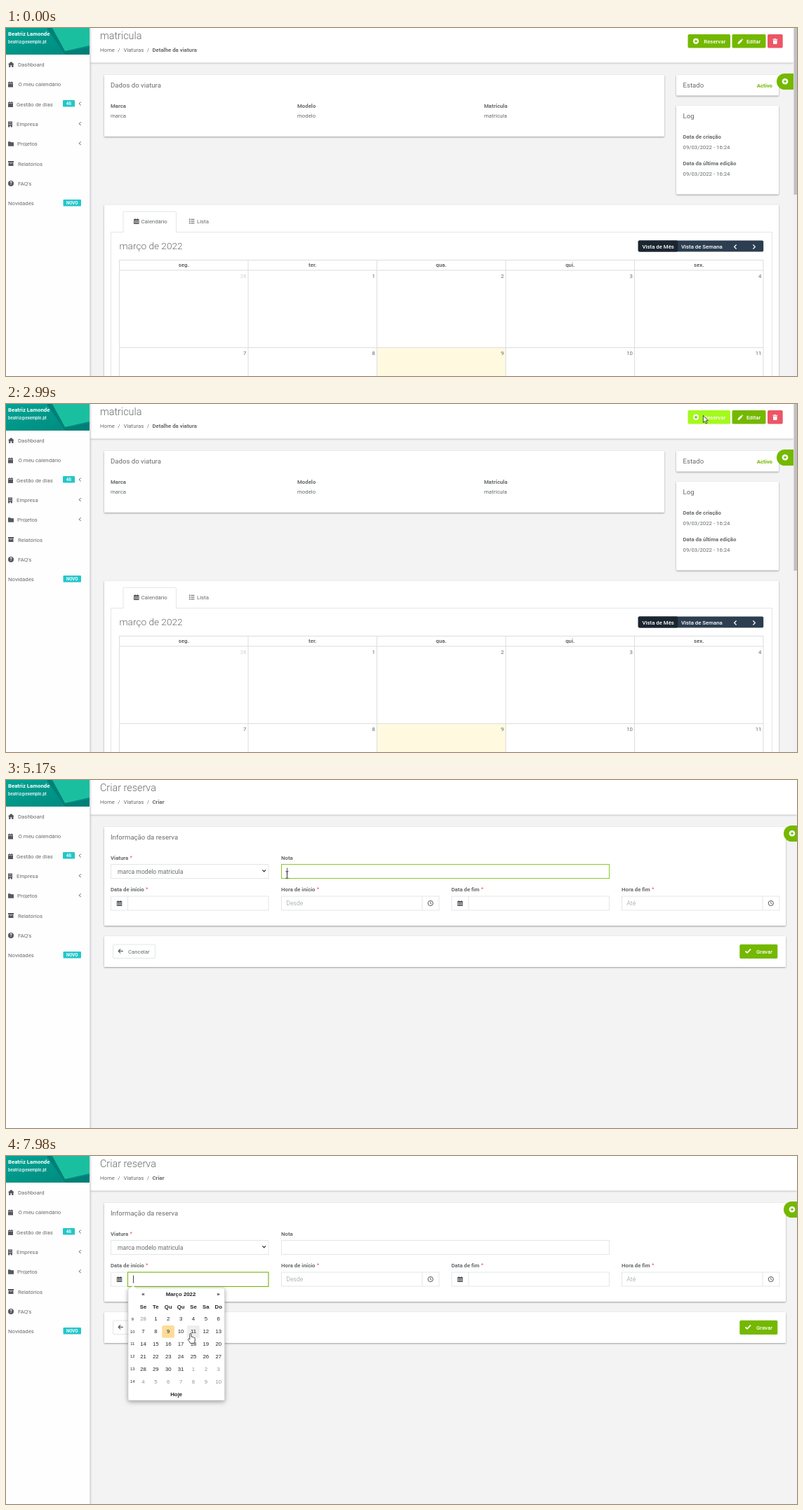
These frames come from a looping animation (1127 px wide and 497 px high, 8000 ms). An HTML page:

```html
<!DOCTYPE html>
<html lang="pt">
<head>
<meta charset="utf-8">
<title>Criar reserva</title>
<style>
  html, body { margin: 0; width: 100%; height: 100%; overflow: hidden; background: #f3f3f4; }
  svg { display: block; width: 100%; height: 100%; }
  text { font-family: Roboto, sans-serif; white-space: pre; }
  .picker text { font-family: "Liberation Sans", Arial, sans-serif; }
  .card { fill: #fff; filter: drop-shadow(0 1px 1px rgba(0, 0, 0, .36)); }
  .pop { fill: #fff; filter: drop-shadow(0 2px 3px rgba(0, 0, 0, .35)); }
</style>
</head>
<body>
<svg id="stage" viewBox="0 0 1127 497" xmlns="http://www.w3.org/2000/svg"></svg>
<script>
const LOOP = 8000;
const GREEN = '#74b800', GREY = '#676a6c', DARK = '#54575a', LINE = '#e3e5e7';

// Text placed by the middle of its capitals.
function text(x, y, str, o = {}) {
  const { size = 7.8, weight = 400, fill = GREY, anchor = 'start', font = '' } = o;
  const family = font ? ` style="font-family:${font},sans-serif"` : '';
  return `<text x="${x}" y="${y + size * .355}" font-size="${size}" font-weight="${weight}" fill="${fill}" text-anchor="${anchor}"${family}>${str}</text>`;
}
const bold = (x, y, str, o = {}) => text(x, y, str, { weight: 700, ...o });
const heading = (x, y, str) => text(x, y, str, { size: 9.6 });
const rect = (x, y, w, h, attrs) => `<rect x="${x}" y="${y}" width="${w}" height="${h}" ${attrs}/>`;
const box = (x, y, w, h, attrs = '') => rect(x + .5, y + .5, w - 1, h - 1, `fill="#fff" stroke="${LINE}" ${attrs}`);
const card = (x, y, w, h) => rect(x, y, w, h, 'class="card" rx="1"');
const button = (x, y, w, h, fill, id = '') => rect(x, y, w, h, `rx="1.8" fill="${fill}" ${id && `id="${id}"`}`);
const shape = (x, y, d, fill = DARK) => `<path transform="translate(${x} ${y})" d="${d}" fill="${fill}" fill-rule="evenodd"/>`;
const stroke = (x, y, d, color = DARK, w = 1.2) => `<path transform="translate(${x} ${y})" d="${d}" fill="none" stroke="${color}" stroke-width="${w}"/>`;
const group = (id, body, attrs = '') => `<g id="${id}" ${attrs}>${body}</g>`;
const range = n => [...Array(n).keys()];

const ICON = {
  house: 'M4.3 0 8.8 4H7.5V8H5.2V5.2H3.4V8H1.1V4H-.2Z',
  calendar: 'M0 1H1.3V0H2.5V1H4.5V0H5.7V1H7V8H0ZM.4 2.4V3H6.6V2.4Z',
  building: 'M0 0H6V8H3.7V6.3H2.3V8H0ZM1.3 1.2V2.3H2.4V1.2ZM3.6 1.2V2.3H4.7V1.2ZM1.3 3.6V4.7H2.4V3.6ZM3.6 3.6V4.7H4.7V3.6Z',
  folder: 'M0 .5H3L4 1.5H8V7H0Z',
  archive: 'M0 0H8V2H0ZM.5 2.6H7.5V7H.5ZM3 3.4V4.1H5V3.4Z',
  grid: 'M0 1H1.5V0H2.5V1H5V0H6V1H7.5V8H0ZM.9 3V4.2H2.2V3ZM3.1 3V4.2H4.4V3ZM5.3 3V4.2H6.6V3ZM.9 5.3V6.6H2.2V5.3ZM3.1 5.3V6.6H4.4V5.3ZM5.3 5.3V6.6H6.6V5.3Z',
  pencil: 'M0 8 .5 5.6 4.8 1.3 6.7 3.2 2.4 7.5ZM5.4.7 6.1 0 8 1.9 7.3 2.6Z',
  trash: 'M0 .8H2.2L2.7 0H4.3L4.8.8H7V1.8H0ZM.5 2.4H6.5L6.1 8H.9Z',
  list: 'M0 0H1.4V1.4H0ZM2.4.2H7.5V1.2H2.4ZM0 2.8H1.4V4.2H0ZM2.4 3H7.5V4H2.4ZM0 5.6H1.4V7H0ZM2.4 5.8H7.5V6.8H2.4Z'
};
const plusDisc = (x, y, r, ink) =>
  `<circle cx="${x}" cy="${y}" r="${r}" fill="#fff"/>` + stroke(x, y, 'M-2.2 0H2.2M0 -2.2V2.2', ink, 1.2);
const clock = (x, y) =>
  `<circle cx="${x}" cy="${y}" r="3.6" fill="none" stroke="${DARK}"/>` + stroke(x, y, 'M0 -2.2V.2L1.5 1', DARK, .9);
const fab = (x, right) =>
  shape(x, 65, `M${right - x} 0H11.5A11.5 11.5 0 0 0 11.5 23H${right - x}Z`, GREEN) + plusDisc(x + 12, 76.3, 4.3, GREEN);

function sidebar() {
  const items = [
    [17, 52, 'Dashboard', 'house'], [17.5, 80.5, 'O meu calendário', 'calendar'],
    [15, 109, 'Gestão de dias', 'calendar'], [15, 137.5, 'Empresa', 'building'],
    [16, 165.7, 'Projetos', 'folder'], [17, 194, 'Relatórios', 'archive'],
    [17, 222.3, "FAQ's"], [3, 250.7, 'Novidades']
  ];
  const badge = (x, y, w, str) => rect(x, y, w, 9.4, 'rx="1" fill="#23c6c8"') +
    bold(x + w / 2, y + 4.7, str, { size: 5.5, fill: '#fff', anchor: 'middle', font: 'Inter' });
  return rect(0, 0, 119.5, 497, 'fill="#fefefe" style="filter:drop-shadow(1px 0 1px rgba(0,0,0,.22))"') +
    rect(0, 0, 119, 38, 'fill="url(#teal)"') +
    shape(0, 0, 'M58 0H70L92 33 119 27V38H84Z', '#007f78') +
    shape(0, 0, 'M66 0H119V25L84 33Z', '#1abf9f') +
    bold(3, 8, 'Beatriz Lamonde', { fill: '#fff', weight: 600 }) +
    text(3, 20.5, 'beatriz@exemplo.pt', { size: 5.6, weight: 600, fill: '#fff', font: 'Inter' }) +
    items.map(([x, y, str, icon]) => text(x, y, str) + (icon ? shape(3, y - 4, ICON[icon]) : '')).join('') +
    `<circle cx="7" cy="222" r="4" fill="${DARK}"/>` + bold(7, 222, '?', { size: 6.5, fill: '#fff', anchor: 'middle' }) +
    badge(81, 103, 17, '46') + badge(81.5, 245, 25.5, 'NOVO') +
    [108, 136.7, 164.7].map(y => stroke(104, y, 'M2.6 -2.4 .2 0 2.6 2.4', DARK, 1)).join('');
}

function header(title, leaf, right) {
  return rect(120, -5, right - 120, 54.5, 'class="card" style="filter:drop-shadow(0 1px 1px rgba(0,0,0,.2))"') +
    text(134, 11, title, { size: 14.4, weight: 300 }) +
    text(134, 31.2, 'Home') + text(159.3, 31.2, '/') + text(167.5, 31.2, 'Viaturas') +
    text(200.8, 31.2, '/') + bold(208.5, 31.2, leaf);
}

function detailPage() {
  const fields = [[149, 'Marca', 'marca'], [415, 'Modelo', 'modelo'], [681, 'Matrícula', 'matricula']];
  const dates = [['Data de criação', 155.5], ['Data da última edição', 193.5]];
  const colX = i => 161.5 + 183.5 * i;
  const days = ['seg.', 'ter.', 'qua.', 'qui.', 'sex.'];
  const white = { fill: '#fff', weight: 500 };
  return header('matricula', 'Detalhe da viatura', 1122) +
    button(971.5, 9, 60.5, 19.5, GREEN, 'reserve') + plusDisc(983, 18.8, 4, GREEN) + text(994.3, 19, 'Reservar', white) +
    button(1034.5, 9, 48, 19.5, GREEN) + shape(1042.5, 15, ICON.pencil, '#fff') + text(1055, 19, 'Editar', white) +
    button(1085, 9, 21.7, 19.5, '#ed5565') + shape(1092.3, 15, ICON.trash, '#fff') +
    card(140, 67, 798, 88) + heading(149, 82, 'Dados do viatura') +
    fields.map(([x, k, v]) => bold(x, 111, k) + text(x, 125.7, v)).join('') +
    card(955, 67, 146, 29.5) + heading(964.5, 82, 'Estado') + bold(1092, 82, 'Activo', { fill: GREEN, anchor: 'end' }) +
    card(955, 111, 146, 126.5) + heading(964.5, 126, 'Log') +
    dates.map(([str, y]) => bold(964.5, y, str) + text(964.5, y + 14.8, '09/03/2022 - 16:24')).join('') +
    card(140, 252.5, 961, 260) + box(149, 291, 943, 230) +
    `<path d="M167 292V264q0 -1.8 1.8 -1.8H240.7q1.8 0 1.8 1.8V292" fill="#fff" stroke="${LINE}"/>` +
    shape(182, 272, ICON.grid) + text(192.5, 276.2, 'Calendário') +
    shape(261, 272.5, ICON.list) + text(272, 276.2, 'Lista') +
    text(161.5, 311.5, 'março de 2022', { size: 13.65, weight: 300 }) +
    button(900.7, 303.5, 178.5, 16, '#2c3e50') + button(900.7, 303.5, 56.5, 16, '#1a252f') +
    text(906.5, 312.6, 'Vista de Mês', white) + text(962, 312.6, 'Vista de Semana', white) +
    stroke(1037, 312.5, 'M3.6 -3 .6 0 3.6 3', '#fff') + stroke(1064, 312.5, 'M.4 -3 3.4 0 .4 3', '#fff') +
    rect(colX(2), 456.5, 183.5, 41, 'fill="#fffadf"') +
    `<path d="M161.5 331.5H1079M161.5 346H1079M161.5 456.5H1079${range(6).map(i => `M${colX(i)} 331V497`).join('')}" fill="none" stroke="#ddd"/>` +
    days.map((d, i) => bold(colX(i) + 91.7, 338.5, d, { anchor: 'middle' }) +
      text(colX(i + 1) - 2.5, 354.3, i || 28, { anchor: 'end', fill: i ? GREY : '#d2d2d3' }) +
      text(colX(i + 1) - 2.5, 464.5, 7 + i, { anchor: 'end' })).join('') +
    fab(1098, 1122) + rect(1122, 0, 5, 497, 'fill="#f1f1f1"') + rect(1122.5, 0, 4.5, 238, 'fill="#c1c1c1"');
}

function formPage() {
  const label = (x, y, str, star) =>
    bold(x, y, str + (star ? '<tspan dx="2.5" dy="-.8" font-size="6.5" fill="#e0604f">*</tspan>' : ''));
  const big = { size: 8.6 }, hint = { size: 8.6, fill: '#b4b6b8' };
  const dateField = (x, str) => label(x, 156.5, str, true) + box(x, 165.5, 225.5, 21) +
    stroke(x + 24.5, 166, 'M0 0V20', LINE, 1) + shape(x + 8.8, 172, ICON.grid);
  const hourField = (x, str, tip) => label(x, 156.5, str, true) + box(x, 165.5, 225.5, 21) +
    stroke(x + 201, 166, 'M0 0V20', LINE, 1) + text(x + 7.3, 176.2, tip, hint) + clock(x + 212.8, 176);
  const cards = card(140, 67, 971, 141) + heading(149, 82, 'Informação da reserva') +
    label(149, 111, 'Viatura', true) + box(149, 120, 225.5, 21) + text(159, 130.7, 'marca modelo matricula', big) +
    stroke(367.7, 129.5, 'M-2.3 -1 0 1.3 2.3 -1', '#444', 1.3) +
    label(392, 111, 'Nota') + box(392, 120, 468, 21, 'id="note"') +
    dateField(149, 'Data de início') + hourField(392, 'Hora de início', 'Desde') +
    dateField(634.5, 'Data de fim') + hourField(877, 'Hora de fim', 'Até') +
    card(140, 223, 971, 44) + box(152, 234.5, 61, 20.5, 'rx="1.5"') +
    stroke(159.5, 244.3, 'M7.3 0H.8M3.6 -3 .7 0 3.6 3', DARK, 1.2) + text(174, 244.9, 'Cancelar') +
    button(1045.3, 234.7, 54, 20.3, GREEN) + stroke(1053, 244.3, 'M.5 0 3 2.5 8 -2.6', '#fff', 1.8) +
    text(1069, 244.9, 'Gravar', { fill: '#fff', weight: 500 });
  return header('Criar reserva', 'Criar', 1127) + group('cards', cards) + fab(1108, 1127) +
    group('dateFocus', rect(173.5, 166, 200.5, 20.5, `fill="none" stroke="${GREEN}"`)) +
    group('noteCaret', rect(400, 125.5, .8, 10, 'fill="#333"')) +
    group('dateCaret', rect(181, 170.5, .9, 11, 'fill="#333"'));
}

function picker() {
  const mid = { anchor: 'middle', fill: '#212529' };
  const colX = i => 195.5 + 17.87 * i, rowY = i => 232.6 + 17.87 * i;
  // Day 0 is the last Monday of February.
  const cell = n => {
    const other = n < 1 || n > 31;
    const day = n < 1 ? 28 : n > 31 ? n - 31 : n;
    return text(colX(n % 7), rowY(Math.floor(n / 7)), day, { ...mid, fill: other ? '#8f9499' : '#212529' });
  };
  return rect(174, 188.5, 137.5, 160.5, 'class="pop" rx="2" stroke="#ccc" stroke-width=".6"') +
    shape(181, 185, 'M-4 4 0 0 4 4Z', '#fff') +
    bold(195.5, 197, '«', mid) + bold(249, 197, 'Março 2022', mid) + bold(302.5, 197, '»', mid) +
    ['Se', 'Te', 'Qu', 'Qu', 'Se', 'Sa', 'Do'].map((d, i) => bold(colX(i), 215, d, mid)).join('') +
    rect(222.3, 242, 17.6, 17.8, 'rx="2" fill="#ffdb99"') +
    group('hover', rect(258, 242, 17.8, 17.8, 'rx="2" fill="#eee"')) +
    range(6).map(i => text(180.3, rowY(i), 9 + i, { ...mid, size: 5.8 })).join('') +
    range(42).map(cell).join('') + bold(242.7, 340, 'Hoje', mid);
}

const POINTERS = {
  arrow: '<path d="M.4 .4V10.4L2.6 8.4 4.2 12.1 5.8 11.4 4.2 7.8H7.4Z" fill="#fff" stroke="#222" stroke-width=".8"/>',
  hand: '<path d="M-1.2 1.2Q0 -.3 1 1.2V5.2Q2.4 4.6 2.8 5.8 4.2 5.2 4.6 6.4 6.3 6 6.3 7.6V10Q6.2 12 5 14.4H-.4Q-1.4 12 -3.4 9.8-4.2 8.2-2.7 7.8L-1.2 9Z" fill="#fff" stroke="#222" stroke-width=".8"/>',
  beam: '<path d="M-2 -4.8H-.6Q0 -4.8 0 -4V4Q0 4.8 -.6 4.8H-2M2 -4.8H.6Q0 -4.8 0 -4M0 4Q0 4.8 .6 4.8H2" fill="none" stroke="#222" stroke-width=".9"/>'
};

document.getElementById('stage').innerHTML =
  '<defs><linearGradient id="teal" x2="1" y2="1"><stop stop-color="#00a594"/><stop offset="1" stop-color="#00867c"/></linearGradient></defs>' +
  rect(0, 0, 1127, 497, 'fill="#f3f3f4"') +
  group('detail', detailPage()) + group('form', formPage()) + group('picker', picker(), 'class="picker"') + sidebar() +
  Object.entries(POINTERS).map(([id, body]) => group(id, body)).join('');

// Pointer moves: start, end, steps, target x, target y, look
const MOVES = [
  [1770, 2130, 6, 945, 24, 'arrow'],
  [2200, 2280, 2, 993, 16, 'hand'],
  [2990, 2990, 1, 993, 16, 'arrow'],
  [3470, 4140, 10, 359, 125, 'arrow'],
  [4460, 4550, 2, 408, 131, 'beam'],
  [5170, 5170, 1, 400.5, 135.5, 'beam'],
  [5250, 5410, 3, 335.5, 194, 'arrow'],
  [5570, 5630, 2, 331.5, 184, 'beam'],
  [6180, 6320, 3, 264, 223, 'arrow'],
  [6470, 6800, 5, 264, 247, 'hand'],
  [7100, 7250, 3, 268, 257, 'hand'],
  [7670, 7820, 3, 262, 253, 'hand'],
  [7980, 7980, 1, 263, 253, 'hand']
];

// Share of the move done; the first step lands at the start time.
function stepped(t, start, end, steps) {
  if (t < start) return 0;
  if (t >= end) return 1;
  return (Math.floor((t - start) / (end - start) * (steps - 1)) + 1) / steps;
}

function pointerAt(t) {
  let x = 1140, y = 42, look = '';
  for (const [start, end, steps, tx, ty, kind] of MOVES) {
    if (t < start) break;
    const p = stepped(t, start, end, steps);
    x += (tx - x) * p;
    y += (ty - y) * p;
    look = kind;
  }
  return { x, y, look };
}

const $ = id => document.getElementById(id);
const show = (id, on) => $(id).setAttribute('display', on ? 'inline' : 'none');
const within = (t, a, b) => t >= a && t < b;
const blink = (t, start) => Math.floor((t - start) / 530) % 2 === 0;
const mix = (a, b, p) => `rgb(${a.map((v, i) => Math.round(v + (b[i] - v) * p))})`;

function draw(t) {
  show('detail', t < 3150);
  show('form', t >= 3150);
  const settled = t >= 3390;
  $('cards').setAttribute('opacity', settled ? 1 : .5);
  $('cards').setAttribute('transform', `translate(${settled ? 0 : 8} 0)`);

  const glow = t < 2280 ? 0 : .15 + .85 * stepped(t, 2450, 2680, 4);
  $('reserve').setAttribute('fill', mix([116, 184, 0], [164, 250, 28], glow));

  $('note').setAttribute('stroke', within(t, 4780, 5780) ? '#8cc82d' : LINE);
  show('noteCaret', within(t, 4780, 5240));
  show('dateFocus', t >= 5780);
  show('dateCaret', t >= 5780 && blink(t, 5700));
  show('picker', t >= 5860);
  show('hover', t >= 6720);

  const { x, y, look } = pointerAt(t);
  for (const id in POINTERS) {
    show(id, id === look);
    $(id).setAttribute('transform', `translate(${x} ${y})`);
  }
}

const began = performance.now();
function tick() {
  draw((performance.now() - began) % LOOP);
  requestAnimationFrame(tick);
}
tick();
</script>
</body>
</html>
```
